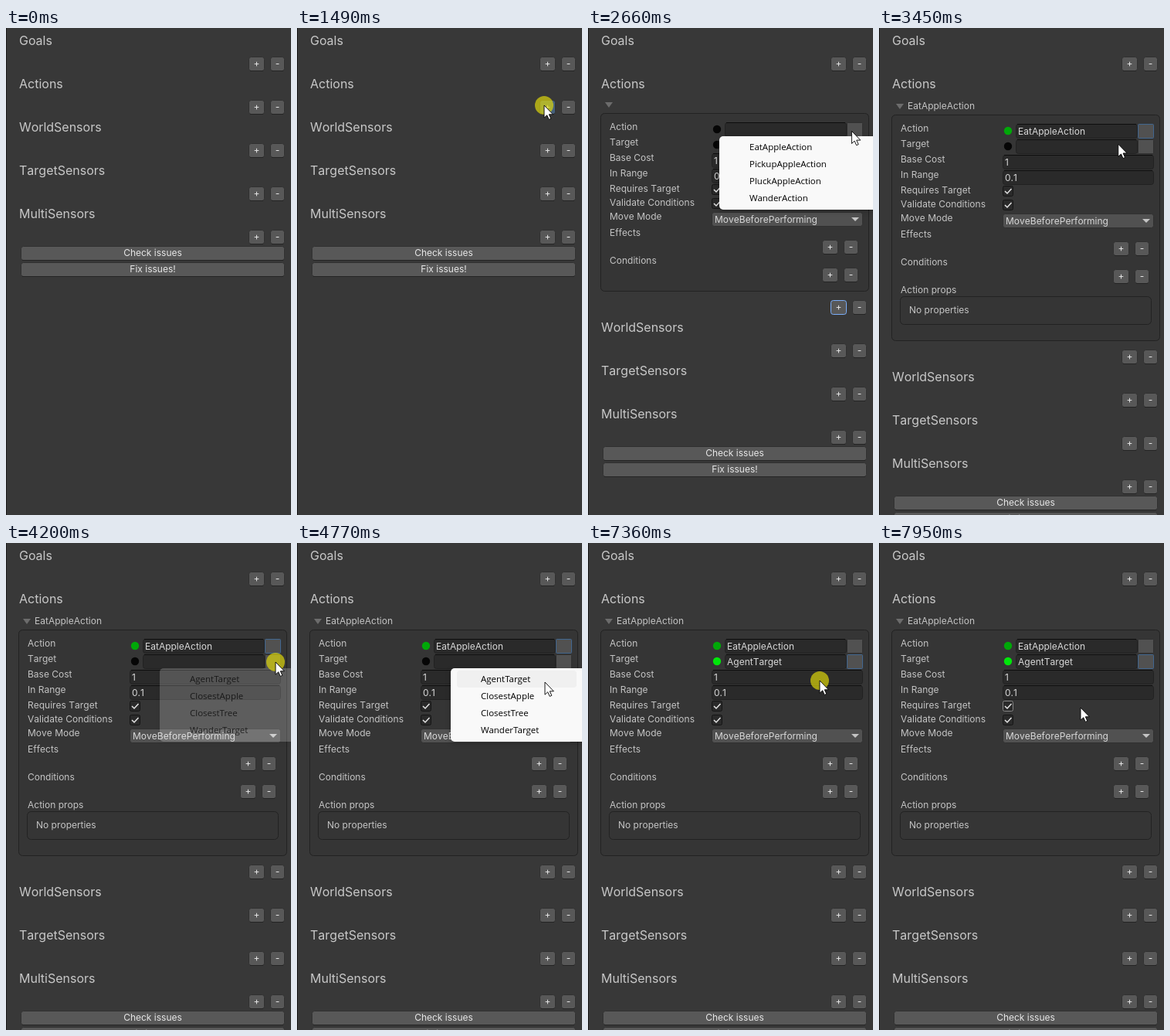
An HTML page for the animation above (7.99 s loop, 369x630 px).

```html
<!DOCTYPE html>
<html lang="en">
<head>
<meta charset="utf-8">
<title>Agent config inspector</title>
<style>
  html, body { margin: 0; width: 100%; height: 100%; overflow: hidden; background: #383838; }
  svg { display: block; width: 369px; height: 630px; }
  text { font: 12px Inter, sans-serif; font-kerning: none; fill: #c4c4c4; white-space: pre; }
  .heading { font-size: 16px; fill: #c8c8c8; }
  .button { fill: #e8e8e8; text-anchor: middle; }
  .value { fill: #d8d8d8; }
  .item { font: 11.5px "Open Sans", "Noto Sans", sans-serif; font-kerning: normal; fill: #000; }
  .menu { filter: drop-shadow(0 2px 3px rgba(0, 0, 0, .25)); }
</style>
</head>
<body>
<svg viewBox="0 0 369 630">
  <rect width="369" height="630" fill="#383838"/>
  <g id="panel"></g>
  <rect width="1" height="630" fill="#1c1c1c"/>
  <g id="popup"></g>
  <circle id="click" r="12" fill="#e2da0a" opacity=".68"/>
  <path id="cursor" d="M0 0V16.2L3.7 12.8 6.2 18.4 8.8 17.3 6.3 11.8H11.4Z" fill="#fff" stroke="#000" stroke-width=".9"/>
</svg>
<script>
const LOOP = 7990;
const CLICK = { add: 1440, pickAction: 2290, chooseAction: 3290, pickTarget: 4200, chooseTarget: 7220 };
const CLICK_TIME = 150, REACTION = 100;
const ADDED = CLICK.add + REACTION;
const ACTION_SET = CLICK.chooseAction + REACTION;
const TARGET_SET = CLICK.chooseTarget + REACTION;

const ENTRY = { x: 281, y: 578 };
const MOVES = [
  { from: 570, to: 1360, x: 320, y: 100 },
  { from: 1800, to: 2210, x: 346, y: 131 },
  { from: 2600, to: 2880, x: 308, y: 150 },
  { from: 3410, to: 3740, x: 349, y: 154 },
  { from: 4610, to: 4770, x: 321, y: 180 },
  { from: 4770, to: 5340, x: 297, y: 245 },
  { from: 5430, to: 5720, x: 299, y: 223 },
  { from: 6550, to: 6790, x: 303, y: 209 },
  { from: 7000, to: 7160, x: 300, y: 178 },
  { from: 7420, to: 7950, x: 261, y: 213 }
];

const SECTIONS = ['Goals', 'Actions', 'WorldSensors', 'TargetSensors', 'MultiSensors'];
const SECTION_STEP = 56, ROW = 22;
const POPUPS = [
  { open: CLICK.pickAction, close: ACTION_SET, x: 171, y: 141,
    items: ['EatAppleAction', 'PickupAppleAction', 'PluckAppleAction', 'WanderAction'] },
  { open: CLICK.pickTarget, close: TARGET_SET, x: 200, y: 163,
    items: ['AgentTarget', 'ClosestApple', 'ClosestTree', 'WanderTarget'] }
];

const byId = id => document.getElementById(id);
const clamp = v => Math.max(0, Math.min(1, v));
const smooth = k => k * k * (3 - 2 * k);

function pointerAt(t) {
  if (t < MOVES[0].from) return null;
  return MOVES.reduce((at, { from, to, x, y }) => {
    const k = smooth(clamp((t - from) / (to - from)));
    return { x: at.x + (x - at.x) * k, y: at.y + (y - at.y) * k };
  }, ENTRY);
}

const text = (x, y, str, cls = '') => `<text class="${cls}" x="${x}" y="${y}">${str}</text>`;
const label = (x, mid, str, cls) => text(x, mid + 4, str, cls);
const stack = (mid, step, names) => names.map((name, i) => label(28, mid + i * step, name)).join('');
const box = (x, y, w, h, fill, stroke, r = 3) =>
  `<rect x="${x + .5}" y="${y + .5}" width="${w - 1}" height="${h - 1}" rx="${r}" fill="${fill}" stroke="${stroke}"/>`;

function panelMarkup({ stage, pointer, pressed, popup }) {
  const hit = (x, y, w, h) => pointer && !popup &&
    pointer.x >= x && pointer.x < x + w && pointer.y >= y && pointer.y < y + h;

  const button = (x, mid, w, str, focused) => {
    const y = mid - 9, over = hit(x, y, w, 18);
    const fill = over ? (pressed ? '#46607c' : '#676767') : '#585858';
    return box(x, y, w, 19, fill, focused ? '#7baefa' : '#303030') +
      (focused ? '' : `<path d="M${x + 2} ${y + 18.5}h${w - 4}" stroke="#242424"/>`) +
      label(x + w / 2, mid, str, 'button');
  };
  const plusMinus = (x, mid, focused) =>
    button(x, mid, 21, '+', focused) + button(x + 28, mid, 19, '-');
  const field = (x, mid, w, str) =>
    box(x, mid - 9, w, 19, '#2a2a2a', '#212121') +
    `<path d="M${x + 2} ${mid - 8.5}h${w - 4}" stroke="#0d0d0d"/>` + label(x + 3, mid + 1, str, 'value');
  const reference = (mid, str, dot, focused) =>
    `<circle cx="167" cy="${mid}" r="5.2" fill="${dot}"/>` + field(177, mid, 158, str) +
    box(335, mid - 9, 21, 19, hit(335, mid - 9, 21, 19) ? '#606060' : '#515151', focused ? '#41668f' : '#303030', 1);
  const checkbox = mid =>
    box(160, mid - 7, 14, 14, '#2a2a2a', hit(28, mid - 8, 330, 16) ? '#858585' : '#151515', 2) +
    `<path d="M163 ${mid}l3 3 5.5-6" fill="none" stroke="#e4e4e4" stroke-width="1.5"/>`;

  function actionCard() {
    const filled = stage > 1, done = stage > 2;
    const groups = ['Effects', 'Conditions'].concat(filled ? 'Action props' : []);
    return `<g transform="translate(0 ${filled ? 0 : -2})">` +
      '<path d="M22 98h10l-5 7z" fill="#6c6c6c"/>' +
      (filled ? label(37, 101, 'EatAppleAction') : '') +
      box(16, 112, 348, filled ? 293 : 231, '#353535', '#222', 5) +
      stack(130, 20, ['Action', 'Target', 'Base Cost', 'In Range', 'Requires Target']) +
      stack(228, 18, ['Validate Conditions', 'Move Mode']) + stack(267, 36, groups) +
      reference(133, filled ? 'EatAppleAction' : '', filled ? '#00a808' : '#060606', filled && !done) +
      reference(153, done ? 'AgentTarget' : '', done ? '#00e60a' : '#060606', done) +
      field(160, 173, 196, '1') + field(160, 193, 196, '0.1') +
      checkbox(211) + checkbox(229) +
      box(160, 240, 196, 19, '#515151', '#303030') + label(164, 250, 'MoveBeforePerforming', 'value') +
      '<path d="M341 247h10l-5 5z" fill="#c4c4c4"/>' +
      plusMinus(303, 285) + plusMinus(303, 321) +
      (filled ? box(27, 347, 326, 37, '#353535', '#222', 5) + label(39, 365, 'No properties') : '') + '</g>';
  }

  const shift = stage && (stage > 1 ? 323 : 259);
  const sections = SECTIONS.map((name, i) => {
    const y = 16 + SECTION_STEP * i;
    return text(17, y + (i > 1 ? shift : 0) + 5.5, name, 'heading') +
      plusMinus(314, y + 30 + (i ? shift : 0), i === 1 && stage === 1);
  }).join('');
  return sections + (stage ? actionCard() : '') +
    button(19, 291 + shift, 342, 'Check issues') + button(19, 312 + shift, 342, 'Fix issues!');
}

function popupMarkup({ x, y, items, open }, t, pointer) {
  const fade = clamp(.2 + (t - open) / 200);
  const row = Math.floor((pointer.y - y - 2) / ROW);
  const hover = t > open + 360 && row >= 0 && row < items.length
    ? `<rect x="${x + 7}" y="${y + 2 + row * ROW}" width="155" height="${ROW}" rx="4" fill="#f0f0f0"/>` : '';
  return `<rect class="menu" x="${x - 1}" y="${y - 1}" width="220" height="95" rx="5" fill="#f9f9f9" opacity="${fade}"/>` +
    hover + `<g opacity="${clamp(.6 + fade / 2)}">` +
    items.map((name, i) => text(x + 38, y + 17 + i * ROW, name, 'item')).join('') + '</g>';
}

function render(t) {
  const pointer = pointerAt(t);
  const stage = [ADDED, ACTION_SET, TARGET_SET].filter(time => t >= time).length;
  const pressed = Object.values(CLICK).some(time => t >= time && t < time + CLICK_TIME);
  const popup = POPUPS.find(p => t >= p.open && t < p.close);

  byId('panel').innerHTML = panelMarkup({ stage, pointer, pressed, popup });
  byId('popup').innerHTML = popup ? popupMarkup(popup, t, pointer) : '';
  for (const [id, shown] of [['cursor', pointer], ['click', pointer && pressed]]) {
    byId(id).style.display = shown ? '' : 'none';
    if (shown) byId(id).setAttribute('transform', `translate(${pointer.x} ${pointer.y})`);
  }
}

const start = performance.now();
function tick() {
  render((performance.now() - start) % LOOP);
  requestAnimationFrame(tick);
}
tick();
</script>
</body>
</html>
```
